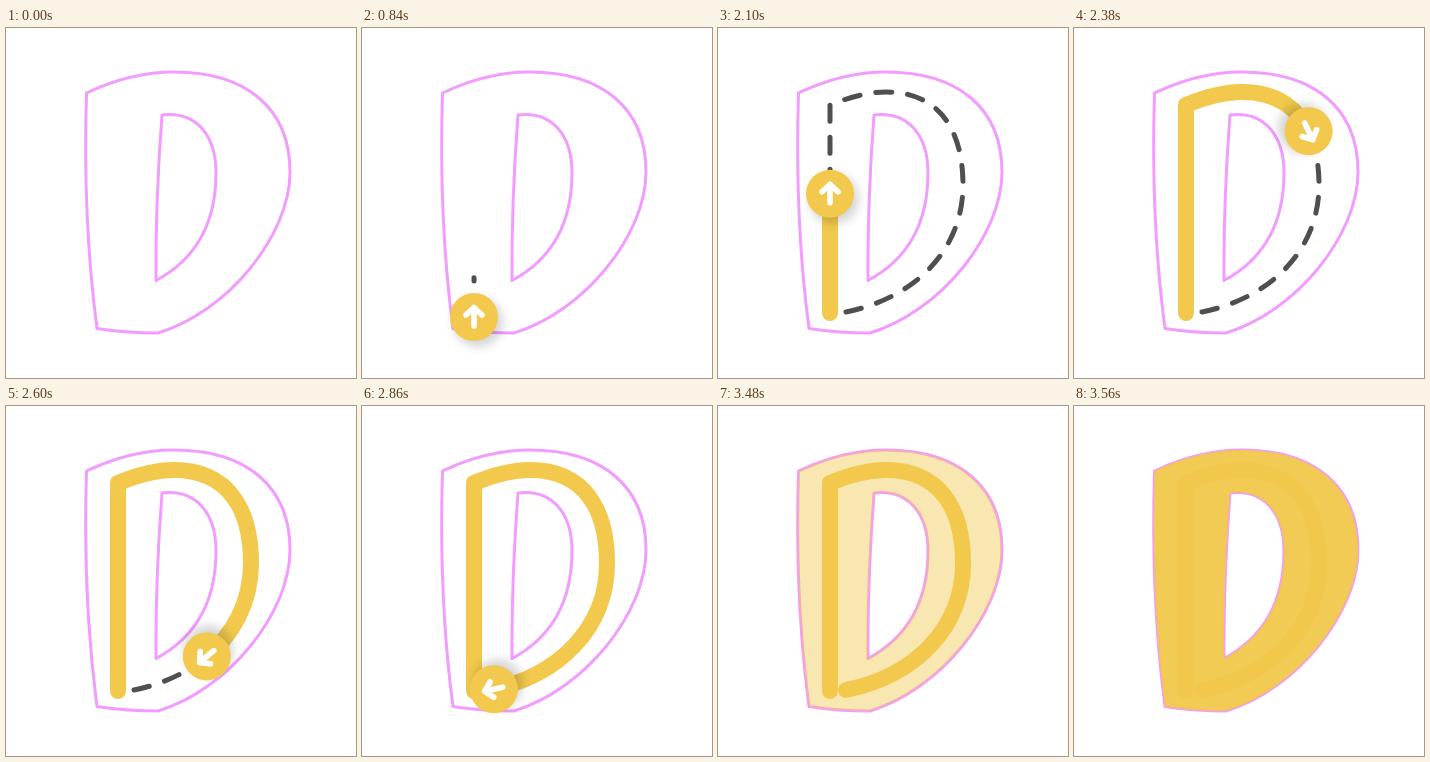
Recreate the animation shown at these times as an HTML page. Size 350 by 350 pixels, loop 4.8 s.

```html
<!DOCTYPE html>
<html lang="en">
<head>
<meta charset="utf-8">
<title>Tracing the letter D</title>
<style>
  html, body { margin: 0; width: 100%; height: 100%; overflow: hidden; background: #fff; }
  svg { display: block; width: 100%; height: 100%; }
  path { fill: none; stroke-linecap: round; stroke-linejoin: round; }
</style>
</head>
<body>
<svg viewBox="0 0 350 350">
  <defs>
    <path id="letter" d="M80.5 65C110 51 138 44 168 44C240 44 284 80 284 144C284 207 222 284 152 305Q120 305 91 300.5C81 225 78 145 80.5 65Z
      M156 87C190 83 210 107 210 145C210 193 192 230 150 252.5C149.5 195 152 140 156 87Z"/>
    <radialGradient id="shade">
      <stop offset=".5" stop-opacity=".17"/>
      <stop offset=".68" stop-opacity=".1"/>
      <stop offset=".85" stop-opacity=".025"/>
      <stop offset="1" stop-opacity="0"/>
    </radialGradient>
  </defs>
  <use href="#letter" stroke="#f29cff" stroke-width="3"/>
  <path id="dashes" stroke="#4f4f4f" stroke-width="5"/>
  <path id="trail" stroke="#f2c94c" stroke-width="16"/>
  <path id="fill" style="fill:#f2c94c;fill-rule:evenodd"/>
  <g id="disc">
    <circle cx="4" cy="5" r="34" fill="url(#shade)"/>
    <circle r="24" fill="#f2c94c"/>
    <path d="M0 9V-9.5M-8 -2L0 -9.5L8 -2" stroke="#fff" stroke-width="5.6"/>
  </g>
</svg>
<script>
const LOOP = 4800;
const LAG = 4; // the disc trails the tip of the line
const [dashes, trail, fill, disc] =
  ['dashes', 'trail', 'fill', 'disc'].map(id => document.getElementById(id));

const route = 'M112 285V77C130 69.5 150 64 168 64C222 64 245 103 245 157C245 222 197 270 128 284';
dashes.setAttribute('d', route);
trail.setAttribute('d', route);
fill.setAttribute('d', document.getElementById('letter').getAttribute('d'));

const length = trail.getTotalLength();
const dash = length / 37;

const ramp = (t, from, to) => Math.min(1, Math.max(0, (t - from) / (to - from)));
const ease = u => (1 - Math.cos(Math.PI * u)) / 2;

function pointAt(s) {
  return s < 0 ? { x: 112, y: 285 - s } : trail.getPointAtLength(s);
}

function reveal(path, s, pattern) {
  path.style.visibility = s > 0 ? 'visible' : 'hidden';
  path.setAttribute('stroke-dasharray', pattern + ' 2000');
}

function draw(t) {
  const drawn = length * ease(ramp(t, 670, 1760));
  const period = 2 * dash;
  const whole = Math.floor(drawn / period);
  const part = Math.min(dash, drawn - whole * period);
  reveal(dashes, drawn, `${dash} ${dash} `.repeat(whole) + part);

  const traced = length * ease(ramp(t, 1775, 2855));
  reveal(trail, traced, traced);

  const s = traced - LAG;
  const p = pointAt(s), a = pointAt(s - 0.5), b = pointAt(s + 0.5);
  const angle = Math.atan2(b.y - a.y, b.x - a.x) * 180 / Math.PI + 90;
  disc.setAttribute('transform', `translate(${p.x} ${p.y}) rotate(${angle})`);
  disc.setAttribute('opacity', ramp(t, 25, 240) * (1 - ramp(t, 3025, 3180)));

  fill.setAttribute('opacity', 0.95 * ramp(t, 3414, 3560));
}

const start = performance.now();
function frame() {
  draw((performance.now() - start) % LOOP);
  requestAnimationFrame(frame);
}
frame();
</script>
</body>
</html>
```
